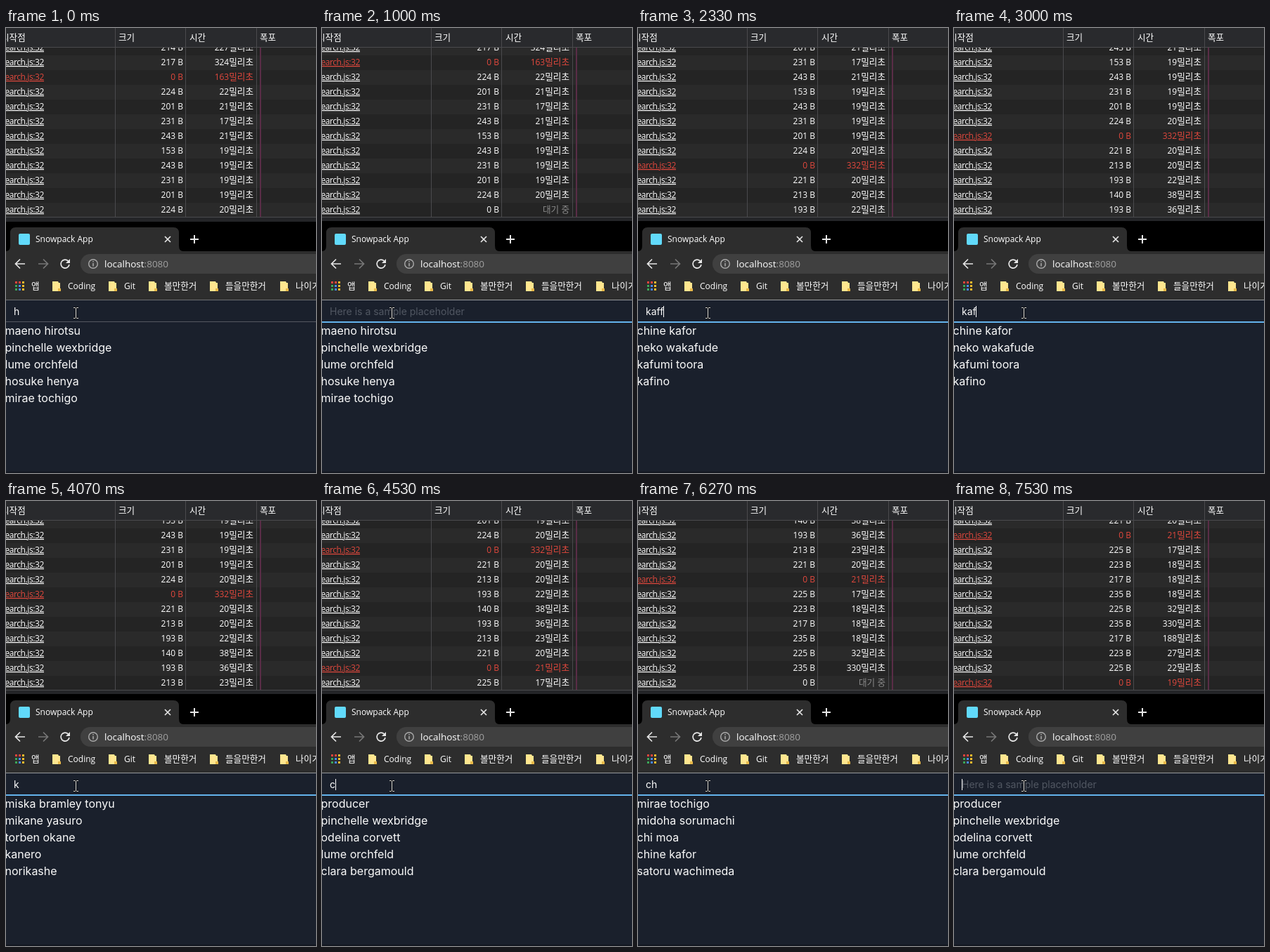
Write an HTML page that moves like this. It is 441 by 634 pixels and loops after 8 s.

```html
<!DOCTYPE html>
<html lang="ko">
<head>
<meta charset="utf-8">
<title>Live search</title>
<style>
  html, body { margin: 0; width: 441px; height: 634px; overflow: hidden; background: #1a202c; }
  svg { display: block; }
  text { font: 12px "Open Sans", "Noto Sans CJK KR", sans-serif; fill: #fff; white-space: pre; }
  .ko { font-size: 12.6px; }
  .end { text-anchor: end; }
  .link { letter-spacing: -.4px; text-decoration: underline; }
  .red text { fill: #e2483d; }
  .page text { font: 16px Inter, sans-serif; fill: #fafafa; }
  .page .input { font-size: 14px; }
  .page .hint { fill: #515762; }
  .line { fill: none; stroke: #e6e6e6; stroke-width: 1.7; }
  .beam { fill: none; stroke: #ddd; }
</style>
</head>
<body>
<svg width="441" height="634" viewBox="0 0 441 634">
  <g id="rows"></g>
  <path d="M362 28V270" stroke="#5a2d47" stroke-width="2"/>
  <rect width="441" height="28" fill="#292a2d"/>
  <path d="M0 27.5H441M155.5 0V270M255.5 0V270M356.5 0V270M0 269.5H441" stroke="#4a4a4d"/>
  <text class="ko" x="-7" y="18">시작점</text>
  <text class="ko" x="160" y="18">크기</text>
  <text class="ko" x="261" y="18">시간</text>
  <text class="ko" x="361" y="18">폭포</text>

  <rect y="270" width="441" height="6" fill="#242528"/>
  <rect id="strip" y="276" width="441" height="50"/>
  <path d="M0 318Q6 318 6 310V292Q6 284 14 284H238Q246 284 246 292V310Q246 318 252 318H441V387H0Z" fill="#2d2d2d"/>
  <rect x="18" y="293" width="16" height="16" rx="2" fill="#61dafb"/>
  <text x="42" y="305">Snowpack App</text>
  <path class="line" d="M226 297l8 8m0-8l-8 8"/>
  <path class="line" d="M262 301h12m-6-6v12" style="stroke-width:2"/>
  <path class="line" d="M27 336H14m6-6.5L13.5 336L20 342.5"/>
  <path class="line" d="M46 336h13m-6-6.5l6.5 6.5l-6.5 6.5" style="stroke:#777"/>
  <path class="line" d="M88.5 332A6 6 0 1 0 90 337"/>
  <path d="M91 329v6h-6z" fill="#e6e6e6"/>
  <rect x="106" y="322" width="360" height="28" rx="14" fill="#404040"/>
  <circle class="line" cx="124" cy="336" r="6.3" style="stroke:#aaa;stroke-width:1.4"/>
  <path d="M124 332v1.6m0 1.4v4.5" stroke="#aaa" stroke-width="1.5"/>
  <text x="140" y="341" style="font-size:13.5px">localhost<tspan fill="#a0a0a0">:8080</tspan></text>
  <g id="bookmarks"></g>

  <g class="page">
    <rect y="388" width="441" height="246" fill="#1a202c"/>
    <rect y="632" width="441" height="2" fill="#131720"/>
    <rect id="topLine" y="387" width="441" height="1"/>
    <rect id="border" y="418" width="441"/>
    <text id="input" x="11" y="409"></text>
    <rect id="caret" y="396" width="1" height="16" fill="#fff"/>
    <g id="list"></g>
  </g>
  <path id="beam" class="beam" d="M96 398.5h2.5l1 1l1-1h2.5M99.5 399v14M96 413.5h2.5l1-1l1 1h2.5"/>
</svg>
<script>
const $ = id => document.getElementById(id);
const label = (x, y, body, cls = '') => `<text x="${x}" y="${y}" class="${cls}">${body}</text>`;
const ko = s => `<tspan class="ko">${s}</tspan>`;

// Requests as "bytes/milliseconds"; zero bytes means cancelled.
const log = ('214/227 217/324 0/163 224/22 201/21 231/17 243/21 153/19 243/19 231/19 201/19 224/20 ' +
  '0/332 221/20 213/20 193/22 140/38 193/36 213/23 221/20 0/21 225/17 223/18 217/18 235/18 ' +
  '225/32 235/330 217/188 223/27 225/22 0/19').split(' ').map(s => s.split('/'));

const results = {
  none: [],
  h: ['maeno hirotsu', 'pinchelle wexbridge', 'lume orchfeld', 'hosuke henya', 'mirae tochigo'],
  k: ['neko wakafude', 'miska bramley tonyu', 'mikane yasuro', 'torben okane', 'kiruma keyo'],
  ka: ['miska bramley tonyu', 'mikane yasuro', 'torben okane', 'kanero', 'norikashe'],
  kaf: ['chine kafor', 'neko wakafude', 'kafumi toora', 'kafino'],
  c: ['producer', 'pinchelle wexbridge', 'odelina corvett', 'lume orchfeld', 'clara bergamould'],
  ch: ['pinchelle wexbridge', 'lume orchfeld', 'mirae tochigo', 'chi moa', 'chine kafor'],
  chi: ['mirae tochigo', 'midoha sorumachi', 'chi moa', 'chine kafor', 'satoru wachimeda'],
  chin: ['chine kafor', 'teru machinabe', 'valentina torchino', 'irena dorochinova mirette', 'chinu morette'],
  chino: ['teru machinose', 'valentina torchino', 'irena dorochinova mirette', 'chino melder']
};

// time, typed text, last request, shown results, flags: p = request pending, - = caret hidden
const steps = [
  [0, 'h', 11, 'h', '-'], [330, 'h', 11, 'h'], [870, '', 11, 'h', '-'], [930, '', 12, 'h', 'p-'],
  [1270, 'k', 12, 'h', 'p'], [1330, 'k', 12, 'h'], [1400, 'k', 13, 'h', 'p'], [1530, 'k', 13, 'k'],
  [1670, 'ka', 13, 'k'], [1730, 'ka', 14, 'ka'], [2070, 'kaf', 14, 'ka'], [2130, 'kaf', 15, 'kaf'],
  [2270, 'kaff', 15, 'kaf'], [2400, 'kaff', 16, 'kaf', 'p'], [2470, 'kaff', 16, 'none'],
  [2870, 'kaf', 16, 'none'], [2930, 'kaf', 17, 'none', 'p'], [3000, 'kaf', 17, 'kaf'], [3400, 'kaf', 17, 'kaf', '-'],
  [3870, 'ka', 17, 'kaf', '-'], [3930, 'ka', 18, 'ka', '-'], [4070, 'k', 18, 'ka', '-'],
  [4130, 'k', 19, 'ka', 'p-'], [4200, 'k', 19, 'k', '-'], [4270, '', 19, 'k', '-'], [4330, '', 20, 'k', '-'],
  [4400, 'c', 20, 'k'], [4470, 'c', 21, 'k', 'p'], [4530, 'c', 21, 'c'],
  [4930, 'ch', 21, 'c'], [5000, 'ch', 22, 'ch'], [5200, 'chi', 22, 'ch'], [5270, 'chin', 23, 'chi'],
  [5330, 'chin', 24, 'chin'], [5470, 'chino', 24, 'chin'], [5530, 'chino', 25, 'chino'],
  [5870, 'chin', 25, 'chino'], [5930, 'chin', 26, 'chino', 'p'], [6070, 'chi', 26, 'chino', 'p-'],
  [6200, 'chi', 26, 'chin', '-'], [6270, 'ch', 27, 'chi', 'p-'], [6330, 'c', 27, 'chi', '-'],
  [6470, '', 28, 'ch'], [6530, '', 29, 'ch'], [6600, '', 29, 'c'], [6670, '', 30, 'c'],
  [7000, '', 30, 'c', '-'], [7530, '', 30, 'c']
];

function row(i, last, pending) {
  const top = 249 - 21 * (last - i), y = top + 14;
  const [size, time] = pending ? [0, ''] : log[i];
  const duration = pending ? '<tspan fill="#8a8a8a" class="ko">대기 중</tspan>' : time + ko('밀리초');
  return `<g class="${!pending && size === '0' ? 'red' : ''}">
    <rect y="${top}" width="441" height="21" fill="${i % 2 ? '#2a2a2a' : '#242424'}"/>` +
    label(54, y, 'earch.js:32', 'end link') + label(252, y, size + ' B', 'end') +
    label(352, y, duration, 'end') + '</g>';
}

function show([, typed, last, key, flags = '']) {
  let rows = '';
  for (let i = last - 11; i <= last; i++) rows += row(i, last, i === last && flags.includes('p'));
  $('rows').innerHTML = rows;
  $('list').innerHTML = results[key].map((name, i) => label(-1.5, 437 + 24 * i, name)).join('');
  const input = $('input');
  input.textContent = typed || 'Here is a sample placeholder';
  input.setAttribute('class', typed ? 'input' : 'input hint');
  $('caret').setAttribute('x', typed ? Math.floor(11 + input.getComputedTextLength()) : 11);
  $('caret').setAttribute('visibility', flags.includes('-') ? 'hidden' : 'visible');
}

function focusWindow(t) {
  const k = Math.min(1, Math.max(0, (t - 330) / 200));
  const mix = (a, b) => a + (b - a) * k;
  $('border').setAttribute('fill', `rgb(${mix(84, 99)},${mix(88, 179)},${mix(97, 237)})`);
  $('border').setAttribute('height', 1 + k);
  $('topLine').setAttribute('fill', `rgb(${mix(107, 150)},${mix(109, 152)},${mix(112, 155)})`);
  $('strip').setAttribute('y', t < 330 ? 276 : 275);
}

const folder = x => `<path d="M${x} 361h8l1 2h2v12h-11z" fill="#ffe68f"/><path d="M${x + 8} 371h4v4h-4z" fill="#e9b949"/>`;
const apps = ['#e8453c', '#e8453c', '#f9bb2d', '#3aa757', '#4688f1', '#f9bb2d', '#3aa757', '#4688f1', '#f9bb2d']
  .map((c, i) => `<rect x="${13 + i % 3 * 5}" y="${361 + Math.floor(i / 3) * 5}" width="3" height="3" fill="${c}"/>`).join('');
$('bookmarks').innerHTML = apps + label(36, 372, '앱', 'ko') +
  [[66, 'Coding'], [146, 'Git'], [203, ko('볼만한거')], [290, ko('들을만한거')], [390, ko('나이가')]]
    .map(([x, name]) => folder(x) + label(x + 22, 372, name)).join('');

// A dark outline under the pointer
const outline = $('beam').cloneNode();
outline.removeAttribute('id');
outline.setAttribute('style', 'stroke:#111;stroke-width:2.5');
$('beam').before(outline);

let current;
function frame() {
  const t = performance.now() % 8000;
  const step = steps.findLast(s => s[0] <= t);
  if (step !== current) show(current = step);
  focusWindow(t);
  requestAnimationFrame(frame);
}
frame();
</script>
</body>
</html>
```
